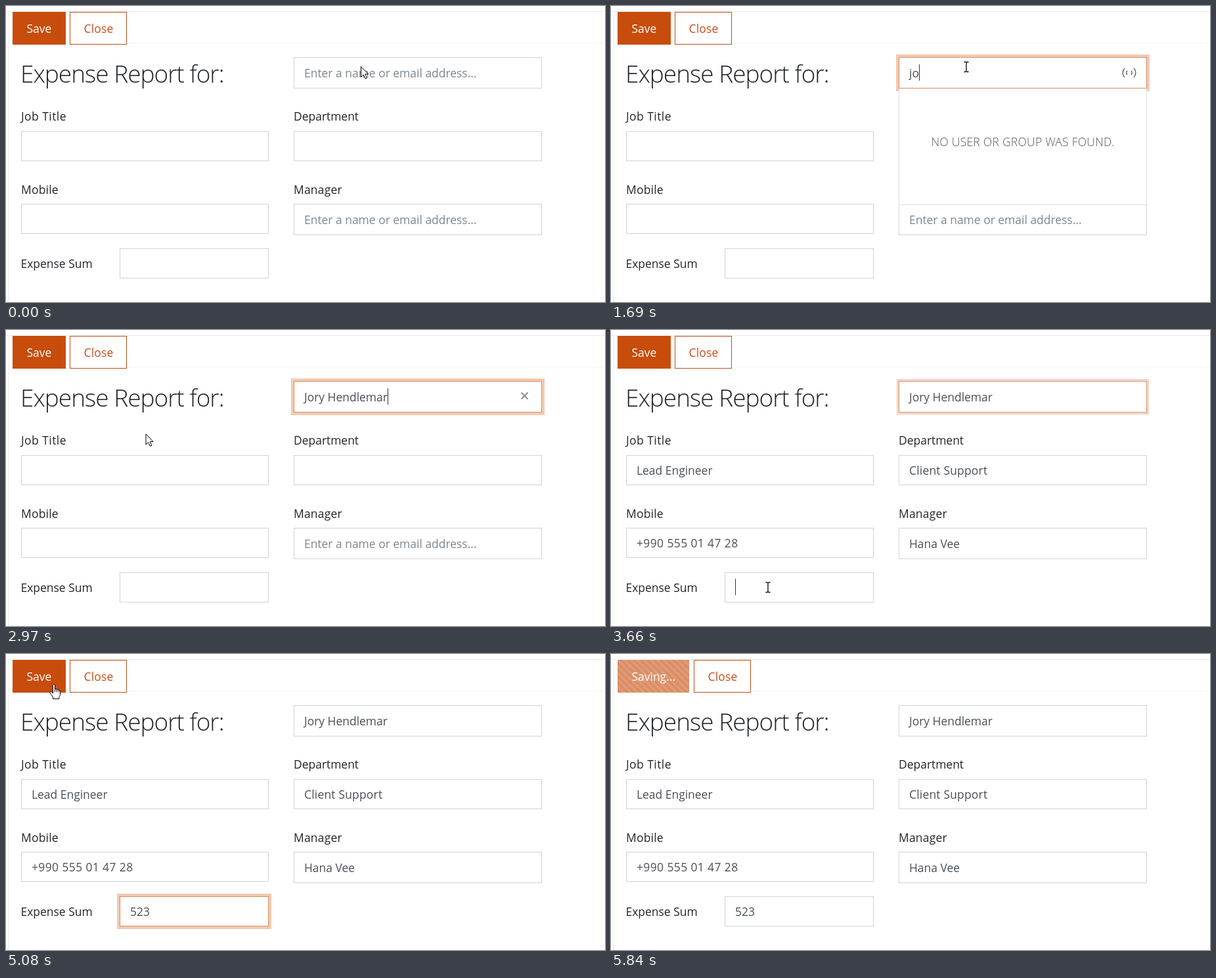
An HTML page for the animation above (5870 ms loop, 912 px wide and 452 px high).

```html
<!DOCTYPE html>
<html lang="en">
<head>
<meta charset="utf-8">
<title>Expense report form</title>
<style>
  html, body { margin: 0; width: 100%; height: 100%; overflow: hidden; background: #fff; }
  svg { display: block; }
  text { font: 17.45px "Open Sans", "Noto Sans", sans-serif; fill: #212529; white-space: pre; }
  .title { font-size: 37px; font-weight: 300; letter-spacing: -1px; }
  .value { fill: #495057; }
  .hint { fill: #7c8791; }
  .empty { fill: #555; font-weight: 300; letter-spacing: .29px; }
  .loose { letter-spacing: .45px; }
  .soft { letter-spacing: .2px; }
  .box { fill: #fff; stroke: #ced4da; }
  .ring { fill: #f0cbb3; }
</style>
</head>
<body>
<svg id="stage" width="912" height="452" viewBox="0 0 912 452">
  <defs>
    <pattern id="stripes" width="7.07" height="7.07" patternUnits="userSpaceOnUse">
      <rect width="7.07" height="7.07" fill="#db8d65"/>
      <rect width="3.54" height="7.07" fill="#e19a75"/>
    </pattern>
    <clipPath id="reveal"><rect id="revealBox" x="438" y="126" width="378" height="0"/></clipPath>
  </defs>
  <path d="M0 8.5H912M3.5 9V452" stroke="#ebebeb"/>
  <path d="M4 56.5H912" stroke="#f4f4f4"/>
  <rect id="save" x="10" y="9" width="81" height="50" fill="#c84c0c"/>
  <text id="saveText" x="31.5" y="41" style="fill:#fff">Save</text>
  <g id="close">
    <rect x="97.5" y="9.5" width="86" height="49" fill="#fff" stroke="#bd4e18"/>
    <text x="118.5" y="41" class="soft" style="fill:#c84c1c">Close</text>
  </g>
  <text x="22" y="117" class="title">Expense Report for:</text>
  <text x="23" y="175" class="loose">Job Title</text>
  <text x="438" y="175">Department</text>
  <text x="23" y="287" class="soft">Mobile</text>
  <text x="438" y="287" class="soft">Manager</text>
  <text x="22.5" y="400">Expense Sum</text>
  <g id="fields"></g>
  <g id="popup" clip-path="url(#reveal)">
    <g id="panel">
      <rect x="438.5" y="125.5" width="377" height="178" fill="#fff" stroke="#dcdfe2"/>
      <text x="487.5" y="214" class="empty">NO USER OR GROUP WAS FOUND.</text>
    </g>
    <g id="result">
      <rect x="438.5" y="125.5" width="377" height="46" fill="#f0f0f0" stroke="#dcdfe2"/>
      <text x="454" y="155" class="value">Jory Hendlemar</text>
    </g>
  </g>
  <g id="spinner" transform="translate(789 102)" fill="none" stroke="#5c5c5c" stroke-width="1.4">
    <path id="outer" d="M-7-7A10 10 0 0 0-7 7M7-7A10 10 0 0 1 7 7"/>
    <path id="inner" d="M-3-3A4.2 4.2 0 0 0-3 3M3-3A4.2 4.2 0 0 1 3 3"/>
  </g>
  <path id="clear" d="M784.5 95.5l10 10m0-10l-10 10" stroke="#929292" stroke-width="2.2"/>
  <rect id="caret" width="1" height="25" fill="#333"/>
  <g id="arrow" fill="#fff" stroke="#000" stroke-linejoin="round">
    <path d="M.5.5V16.5L4.2 13L6.9 19L9.4 17.9L6.8 12.1H11.6Z"/>
  </g>
  <g id="beam" fill="none" stroke="#000" stroke-width="1.3">
    <path d="M-3.5-7.5H-1.2L0-6.8L1.2-7.5H3.5M0-7V7M-3.5 7.5H-1.2L0 6.8L1.2 7.5H3.5"/>
  </g>
  <g id="hand" fill="#fff" stroke="#000" stroke-linejoin="round">
    <path d="M-1.5 1.5Q0-1 1.5 1.5V8Q3 6.5 4.4 8.3Q6 7.2 7.2 9Q9.5 8.3 9.5 11V15Q9.5 18 7.8 19.5V22.5H-1.5V20L-6 13.5Q-6.5 11-4.5 11.2L-1.5 14Z"/>
    <path d="M1.5 8V12M4.4 8.3V12.3M7.2 9V12.5" fill="none"/>
  </g>
</svg>
<script>
const LOOP = 5870;
const PERSON = "Jory Hendlemar";
const HINT = "Enter a name or email address...";
const $ = id => document.getElementById(id);
const clamp = v => Math.min(1, Math.max(0, v));
const ramp = (t, a, b) => clamp((t - a) / (b - a));
const easeOut = v => 1 - (1 - v) ** 3;
const smooth = v => v * v * (3 - 2 * v);
const show = (id, on) => $(id).setAttribute("visibility", on ? "visible" : "hidden");
const set = (el, attrs) => { for (const k in attrs) el.setAttribute(k, attrs[k]); };

function make(name, attrs, parent) {
  const el = document.createElementNS("http://www.w3.org/2000/svg", name);
  set(el, attrs);
  return parent.appendChild(el);
}

// Form fields: x, y, width, height
const boxes = {
  person: [438, 78, 378, 48], job: [23, 191, 377, 46], dept: [438, 191, 378, 46],
  mobile: [23, 302, 377, 46], manager: [438, 302, 378, 48], sum: [173, 370, 227, 46]
};
const fields = {};
for (const id in boxes) {
  const [x, y, width, height] = boxes[id];
  fields[id] = {
    ring: make("rect", { class: "ring" }, $("fields")),
    box: make("rect", { class: "box", x: x + .5, y: y + .5, width: width - 1, height: height - 1 }, $("fields")),
    text: make("text", { x: x + 16, y: y + height / 2 + 7, class: "value" }, $("fields"))
  };
}
fields.mobile.text.style.letterSpacing = ".4px";
fields.dept.text.style.letterSpacing = ".2px";

function setText(id, value, hint) {
  const { text } = fields[id];
  const shown = value || hint || "";
  if (text.textContent !== shown) text.textContent = shown;
  text.setAttribute("class", value ? "value" : "hint");
}

function setFocus(id, amount) {
  const [x, y, w, h] = boxes[id], s = 4 * amount;
  const { ring, box } = fields[id];
  set(ring, { x: x - s, y: y - s, width: w + 2 * s, height: h + 2 * s, opacity: amount });
  const mix = (a, b) => Math.round(a + (b - a) * amount);
  box.style.stroke = `rgb(${mix(206, 222)},${mix(212, 138)},${mix(218, 92)})`;
}

// Latest entry of a [time, value] table
const latest = (table, t) => table.reduce((v, row) => t >= row[0] ? row[1] : v, table[0][1]);
const personSteps = [[0, ""], [1000, "j"], [1260, "jo"], [2430, PERSON]];
const sumSteps = [[0, ""], [4030, "5"], [4190, "52"], [4350, "523"]];
// Caret blink restarts at each of these times
const caretSteps = [[0, null], [340, 340], [1000, 1000], [1260, 1260], [2450, 2450],
  [3640, 3640], [4030, 4030], [4190, 4190], [4350, 4350], [5300, null]];

// Pointer: time, x, y
const path = [
  [0, 540, 92], [289, 540, 92], [290, 541, 93], [1900, 541, 93], [2180, 530, 150],
  [2480, 530, 150], [2760, 330, 160], [2970, 213, 158], [3060, 168, 190], [3150, 140, 242],
  [3300, 152, 318], [3450, 215, 384], [3540, 239, 393], [3690, 239, 393], [3870, 345, 421],
  [4030, 345, 421], [4709, 345, 421], [4710, 234, 396], [4890, 145, 210], [5080, 73, 46],
  [5350, 73, 46], [5560, 260, 200], [5810, 536, 420], [LOOP, 536, 420]
];

function pointerAt(t) {
  const i = Math.max(1, path.findIndex(p => p[0] > t));
  const [t0, x0, y0] = path[i - 1], [t1, x1, y1] = path[i];
  const k = ramp(t, t0, t1);
  return [x0 + (x1 - x0) * k, y0 + (y1 - y0) * k];
}

const inside = (x, y, [bx, by, w, h]) => x >= bx && x < bx + w && y >= by && y < by + h;

function drawPointer(t, listOpen) {
  const [x, y] = pointerAt(t);
  let kind = "arrow";
  if (t >= 290 && Object.values(boxes).some(b => inside(x, y, b))) kind = "beam";
  if (inside(x, y, [10, 9, 174, 50]) || (listOpen && inside(x, y, [438, 126, 378, 46]))) kind = "hand";
  if ((t >= 4030 && t < 4710) || t >= 5825) kind = "";
  for (const id of ["arrow", "beam", "hand"]) show(id, id === kind);
  if (kind) $(kind).setAttribute("transform", `translate(${x.toFixed(1)} ${y.toFixed(1)})`);
}

function drawPopup(t) {
  const found = t >= 2000;
  const full = found ? 47 : 179;
  const open = easeOut(ramp(t, 1270, 1520)) * (1 - smooth(ramp(t, 2420, 2560)));
  const h = full * open;
  show("panel", !found);
  show("result", found);
  $("revealBox").setAttribute("height", h);
  for (const id of ["panel", "result"]) $(id).setAttribute("transform", `translate(0 ${h - full})`);
  const busy = t >= 1290 && t < 2000;
  show("spinner", busy);
  if (busy) {
    $("outer").setAttribute("transform", `rotate(${(t - 1690) * 360 / 700})`);
    $("inner").setAttribute("transform", `rotate(${(t - 1690) * 360 / 1400})`);
  }
  return open > .5 && found;
}

function drawCaret(t, id) {
  const start = latest(caretSteps, t);
  const on = start !== null && (t - start) % 1060 < 530;
  show("caret", on);
  if (!on) return;
  const [x, y, , h] = boxes[id];
  const { text } = fields[id];
  const hint = text.getAttribute("class") === "hint";
  const width = hint ? 0 : text.getComputedTextLength();
  set($("caret"), { x: Math.round(x + 16 + width), y: y + h / 2 - 13 });
}

function drawButtons(t) {
  const saving = t >= 5300;
  const label = saving ? "Saving..." : "Save";
  if ($("saveText").textContent !== label) $("saveText").textContent = label;
  set($("save"), { width: saving ? 109 : 81, fill: saving ? "url(#stripes)" : "#c84c0c" });
  $("close").setAttribute("transform", `translate(${saving ? 29 : 0} 0)`);
  const shift = saving ? (t - 5300) / 1000 * 16 : 0;
  $("stripes").setAttribute("patternTransform", `translate(${shift} 0) rotate(-45)`);
}

function render(t) {
  const filled = t >= 3030;
  setText("person", latest(personSteps, t), HINT);
  setText("job", filled && "Lead Engineer");
  setText("dept", filled && "Client Support");
  setText("mobile", filled && "+990 555 01 47 28");
  setText("manager", filled && "Hana Vee", HINT);
  setText("sum", latest(sumSteps, t));
  setFocus("person", smooth(ramp(t, 300, 500)) * (1 - smooth(ramp(t, 3620, 3760))));
  setFocus("sum", smooth(ramp(t, 3690, 3860)) * (1 - smooth(ramp(t, 5300, 5450))));
  show("clear", t >= 2450 && t < 3640);
  drawButtons(t);
  const listOpen = drawPopup(t);
  drawCaret(t, t < 3640 ? "person" : "sum");
  drawPointer(t, listOpen);
}

const begin = performance.now();
function tick() {
  render((performance.now() - begin) % LOOP);
  requestAnimationFrame(tick);
}
tick();
</script>
</body>
</html>
```
